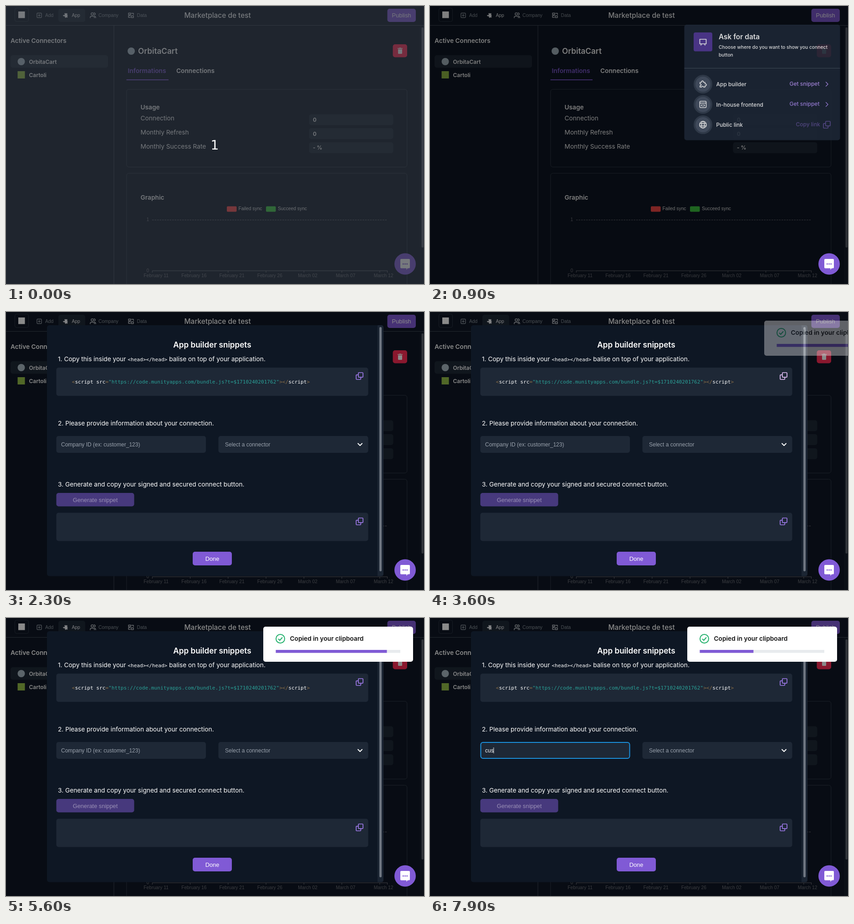
An HTML page for the animation above (8 s loop, 918 by 610 pixels).

```html
<!DOCTYPE html>
<html lang="en">
<head>
<meta charset="utf-8">
<title>Connector snippet demo</title>
<style>
html, body { margin: 0; width: 100%; height: 100%; overflow: hidden; background: #0e1724; }
svg { display: block; }
text { font-family: Inter, sans-serif; font-size: 13.71px; fill: #fff; white-space: pre; }
.b { font-weight: 600; }
.m { font-weight: 500; }
.s12 { font-size: 12px; }
.s17 { font-size: 17.14px; }
.mid { text-anchor: middle; }
.ar { font-family: "Liberation Sans", Arial, sans-serif; }
.nav { font-size: 10.29px; fill: #8a929c; }
.btn { font-size: 12.86px; }
.chart { font-size: 10.29px; fill: #6e7079; }
.hint { font-size: 12px; fill: #9aa2ad; }
.code { font-family: "DejaVu Sans Mono", monospace; font-size: 11.14px; }
.pen text { font-family: Lato, sans-serif; font-size: 13.2px; }
.pen .foot { font-size: 10.4px; }
.pen .ed { font-family: "Liberation Mono", monospace; font-size: 12px; }
.line { fill: none; stroke: currentColor; stroke-width: 1.4; stroke-linejoin: round; stroke-linecap: round; }
.cur { fill: currentColor; }

.t { animation: 8s step-end infinite; }
#count { animation-name: count; }
#hover { animation-name: hover; }
#pill { animation-name: pill; }
#shade { animation-name: shade; }
#pop { animation-name: pop; }
#get { animation-name: get; }
#modal { animation-name: modal; }
#copy1 { animation-name: copy; }
#toast { animation-name: toast; }
#bar { animation-name: bar; transform-origin: 592.5px 0; }
#pen { animation-name: pen; }
#penCaret { animation-name: penCaret; }
#paste { animation-name: paste; }
#focus { animation-name: focus; }
#hint { animation-name: hint; }
#caret { animation-name: caret; }
#k1 { animation-name: k1; }
#k2 { animation-name: k2; }
#k3 { animation-name: k3; }

@keyframes count { 0% { opacity: 1 } 1.2%, 100% { opacity: 0 } }
@keyframes hover { 0% { opacity: 0 } 6.2% { opacity: .45 } 7.45% { opacity: .85 } 8.7% { opacity: 1 }
  9.95% { opacity: .5 } 11.2%, 100% { opacity: 0 } }
@keyframes pill { 0% { opacity: 1 } 9.95% { opacity: 0 } 27.45%, 100% { opacity: 1 } }
@keyframes shade { 0% { opacity: 0 } 9.95% { opacity: .25 } 11.2% { opacity: .5 } 12.45% { opacity: .66 }
  27.45% { opacity: .55 } 28.7%, 100% { opacity: .46 } }
@keyframes pop { 0% { opacity: 0 } 9.95% { opacity: .4 } 11.2% { opacity: .85 } 12.45% { opacity: 1 }
  27.45% { opacity: .3 } 28.7%, 100% { opacity: 0 } }
@keyframes get { 0% { color: #b794f4 } 18.7% { color: #c0a0f6 } 19.95% { color: #ccaff8 }
  21.2% { color: #d7bdfa } 22.45%, 100% { color: #dfc6fc } }
@keyframes modal { 0% { opacity: 0 } 27.45% { opacity: .55 } 28.7%, 100% { opacity: 1 } }
@keyframes copy { 0% { color: #9f7aea } 41.2% { color: #e3c0f8 } 69.95%, 100% { color: #9f7aea } }
@keyframes toast { 0% { opacity: 0 } 44.95% { opacity: .36; transform: translateX(169px) }
  46.2% { opacity: .8; transform: translateX(50px) } 47.45% { opacity: .97; transform: translateX(8px) }
  48.7%, 100% { opacity: 1; transform: none } }
@keyframes bar { 0% { transform: scaleX(1) }
  44.95% { transform: scaleX(1); animation-timing-function: steps(5) } 51.2% { transform: scaleX(.9) }
  69.95% { transform: scaleX(.892); animation-timing-function: steps(24) }
  99.95%, 100% { transform: scaleX(.412) } }
@keyframes pen { 0% { opacity: 0 } 51.2% { opacity: 1 } 69.95%, 100% { opacity: 0 } }
@keyframes penCaret { 0% { opacity: 1 } 57.45% { opacity: 0 }
  63.7%, 100% { opacity: 1; transform: translateX(561px) } }
@keyframes paste { 0% { opacity: 0 } 63.7%, 100% { opacity: 1 } }
@keyframes focus { 0% { opacity: 0 } 84.95% { opacity: .6 } 86.2%, 100% { opacity: 1 } }
@keyframes hint { 0% { opacity: 1 } 92.45%, 100% { opacity: 0 } }
@keyframes caret { 0% { opacity: 0 } 84.95% { opacity: 1; transform: none }
  92.45% { opacity: 1; transform: translateX(6px) } 94.95% { opacity: 1; transform: translateX(12.7px) }
  97.45%, 100% { opacity: 1; transform: translateX(18.7px) } }
@keyframes k1 { 0% { visibility: hidden } 92.45%, 100% { visibility: visible } }
@keyframes k2 { 0% { visibility: hidden } 94.95%, 100% { visibility: visible } }
@keyframes k3 { 0% { visibility: hidden } 97.45%, 100% { visibility: visible } }
</style>
</head>
<body>
<svg width="918" height="610" viewBox="0 0 918 610">
<defs>
  <g id="copy" class="line" style="stroke-width:1.7">
    <rect x="5.8" y="1" width="10.2" height="10.2" rx="1.3"/>
    <path d="M5.5 5.8H2.3A1.3 1.3 0 0 0 1 7.1V14.7A1.3 1.3 0 0 0 2.3 16H9.9A1.3 1.3 0 0 0 11.2 14.7V11.5"/>
  </g>
  <path id="puzzle" d="M-6-3.5H-2.6A2.2 2.2 0 1 1 1.4-3.5H5V0A2.2 2.2 0 1 1 5 4V7H1.6A2 2 0 1 0-2.4 7H-6V3.8A2 2 0 1 0-6 0Z"/>
  <path id="chev" d="M0 0 4.5 4.5 0 9"/>
</defs>

<!-- app page -->
<rect width="918" height="610" fill="#0e1724"/>
<rect x="909" y="43" width="9" height="567" fill="#141d2a"/>
<rect x="912.5" y="47" width="4.5" height="483" rx="2" fill="#5c636c"/>
<path d="M0 42.5H918M237 43V610" stroke="#424b58" fill="none"/>
<rect x="19.500" y="4.500" width="30" height="29.500" rx="4" fill="none" stroke="#2c3644"/>
<rect x="27" y="12" width="14.500" height="14.500" fill="#fff"/>
<rect id="pill" class="t" x="115" y="6" width="59" height="29" rx="5" fill="#1e2836"/>
<g color="#8a929c" class="line">
  <rect x="68" y="15.500" width="10" height="10" rx="1.500"/><path d="M73 18.200V22.800M70.700 20.500H75.300"/>
</g>
<use href="#puzzle" transform="translate(131.500 20) rotate(40) scale(.72)" fill="#eef0f3"/>
<g color="#c3c8ce" class="line">
  <circle cx="189.500" cy="17.500" r="2.600"/><path d="M185 26V24.500Q185 22.500 187.500 22.500H191.500Q194 22.500 194 24.500V26M193.500 15Q196 15.500 196 17.500T193.500 20M195 22.500Q197 23 197 26"/>
  <path d="M269 15.500H274V19H269ZM276 16H280V19M275 21.500H280V25.500H275ZM269 21V25H273M270 21H273"/>
</g>
<g class="ar">
  <text class="ar nav" x="86" y="24">Add</text>
  <text class="ar nav" x="144.500" y="24" style="fill:#e8eaed">App</text>
  <text class="ar nav" x="203" y="24">Company</text>
  <text class="ar nav" x="287.500" y="24">Data</text>
</g>
<text class="m mid" x="464.700" y="25.800" style="font-size:15.43px">Marketplace de test</text>
<rect x="837.500" y="6" width="62.500" height="29" rx="5" fill="#805ad5"/>
<rect id="hover" class="t" x="837.500" y="6" width="62.500" height="29" rx="5" fill="#d6b3fb"/>
<text class="ar btn mid" x="868.700" y="25">Publish</text>

<text class="b" x="10" y="80.500">Active Connectors</text>
<rect x="10" y="108" width="214" height="27.500" rx="5" fill="#1e2836"/>
<circle cx="33.500" cy="122" r="8" fill="#a9bac4"/>
<rect x="25.500" y="143" width="16" height="16" fill="#95bf47"/>
<text class="b s12" x="50.500" y="126.500">OrbitaCart</text>
<text class="b s12" x="50.500" y="156">Cartoli</text>

<circle cx="275" cy="99" r="8" fill="#a9bac4"/>
<text class="b s17" x="290" y="104.700">OrbitaCart</text>
<rect x="849.500" y="84" width="31.500" height="28.500" rx="5" fill="#fe2c55"/>
<path d="M860 92.500H863L864 91.500H867L868 92.500H871V94H860ZM861 95H870V103.500Q870 105 868.500 105H862.500Q861 105 861 103.500Z" fill="#fff"/>
<text class="b" x="267.500" y="147.300" style="fill:#805ad5">Informations</text>
<text class="b" x="374" y="147.300">Connections</text>
<rect x="264.500" y="161" width="92.500" height="1.800" fill="#805ad5"/>
<g fill="none" stroke="#343d4a">
  <rect x="264.800" y="182.800" width="616" height="170.500" rx="5"/>
  <rect x="264.800" y="367" width="616" height="260" rx="5"/>
</g>
<text class="b" x="295.500" y="227">Usage</text>
<text x="295.500" y="251">Connection</text>
<text x="295.500" y="282">Monthly Refresh</text>
<text x="295.500" y="313">Monthly Success Rate</text>
<g fill="#1e2836">
  <rect x="665.500" y="237.500" width="185" height="24" rx="5"/>
  <rect x="665.500" y="268" width="185" height="24" rx="5"/>
  <rect x="665.500" y="299" width="185" height="24" rx="5"/>
</g>
<text class="b s12" x="674" y="253.500">0</text>
<text class="b s12" x="674" y="284.500">0</text>
<text class="b s12" x="674" y="315">- %</text>
<text class="b" x="295.500" y="425">Graphic</text>
<rect x="485" y="439.500" width="21.500" height="12" rx="2" fill="#fe4a49"/>
<rect x="571" y="439.500" width="21.500" height="12" rx="2" fill="#3fcc40"/>
<text class="ar chart" x="510.500" y="448.200" style="fill:#e8e8e8">Failed sync</text>
<text class="ar chart" x="597" y="448.200" style="fill:#e8e8e8">Succeed sync</text>
<text class="ar chart" x="308.500" y="472">1</text>
<text class="ar chart" x="308.500" y="583.500">0</text>
<path d="M321 469.500H838" stroke="#6e7079" stroke-dasharray="3.500 2"/>
<path d="M321 581H838M837.500 581V585" stroke="#6e7079"/>
<g id="axis"></g>

<rect id="shade" class="t" width="918" height="610" fill="#000"/>

<!-- ask for data -->
<g id="pop" class="t">
  <rect x="558.500" y="41" width="342" height="253.500" rx="5" fill="#1e2837"/>
  <path d="M558.500 136.500H900.500" stroke="#4a5563"/>
  <rect x="579" y="58" width="41" height="41.500" rx="4" fill="#553c9a"/>
  <path class="line" color="#fff" d="M592.500 73H606.500V83H592.500ZM596 83 595 86M603 83 604 86" style="stroke-width:1.700"/>
  <text class="b" x="634" y="73" style="font-size:15.43px">Ask for data</text>
  <text class="m" x="634" y="93.500" style="font-size:10.29px">Choose where do you want to show you connect</text>
  <text class="m" x="634" y="110.500" style="font-size:10.29px">button</text>
  <g fill="#4a5568" stroke="#374252" stroke-width="4">
    <circle cx="599.500" cy="171.500" r="18.500"/><circle cx="599.500" cy="216" r="18.500"/><circle cx="599.500" cy="260.500" r="18.500"/>
  </g>
  <g class="line" color="#fff" style="stroke-width:1.600">
    <use href="#puzzle" x="599" y="171"/>
    <rect x="592.500" y="209" width="14" height="14" rx="2"/><path d="M592.500 213H606.500M598 216 596 218 598 220M601 216 603 218 601 220"/>
    <circle cx="599.500" cy="260.500" r="7.500"/><ellipse cx="599.500" cy="260.500" rx="3.200" ry="7.500"/><path d="M592.500 258H606.500M592.500 263H606.500"/>
  </g>
  <text class="m s12" x="628.500" y="176">App builder</text>
  <text class="m s12" x="628.500" y="220.500">In-house frontend</text>
  <text class="m s12" x="628.500" y="265">Public link</text>
  <g id="get" class="t" color="#b794f4">
    <text class="m s12 cur" x="789.500" y="174.500" style="fill:currentColor">Get snippet</text>
    <use href="#chev" class="line" x="869.500" y="167"/>
  </g>
  <g color="#a98aee">
    <text class="m s12" x="789.500" y="219" style="fill:currentColor">Get snippet</text>
    <use href="#chev" class="line" x="869.500" y="211.500"/>
  </g>
  <g color="#5f5094">
    <text class="m s12" x="803.500" y="263.700" style="fill:currentColor">Copy link</text>
    <use href="#copy" x="863" y="252"/>
  </g>
</g>

<!-- snippets dialog -->
<g id="modal" class="t">
  <rect x="90" y="29" width="739" height="550.500" rx="5" fill="#0e1724"/>
  <path d="M816 29H824Q829 29 829 34V574.500Q829 579.500 824 579.500H816Z" fill="#1b2533"/>
  <rect x="820" y="33" width="5" height="536" rx="2.500" fill="#6e7681"/>
  <text class="b s17 mid" x="453" y="78">App builder snippets</text>
  <text x="114" y="108">1. Copy this inside your <tspan class="code">&lt;head&gt;&lt;/head&gt;</tspan> balise on top of your application.</text>
  <g fill="#1e2836">
    <rect x="110.500" y="122" width="685" height="62" rx="5"/>
    <rect x="110.500" y="272" width="328.500" height="37" rx="5"/>
    <rect x="466.500" y="272" width="329" height="37" rx="5"/>
    <rect x="110.500" y="440.500" width="685" height="62" rx="5"/>
  </g>
  <text class="code" x="144.700" y="157"><tspan fill="#8b6f47">&lt;</tspan>script src<tspan fill="#8b6f47">=</tspan><tspan fill="#2aa198">"https://code.munityapps.com/bundle.js?t=$1710240201762"</tspan><tspan fill="#8b6f47">&gt;&lt;/</tspan>script<tspan fill="#8b6f47">&gt;</tspan></text>
  <g id="copy1" class="t" color="#9f7aea"><use href="#copy" x="768" y="132"/></g>
  <g color="#9f7aea"><use href="#copy" x="768" y="451"/></g>
  <text x="114" y="249">2. Please provide information about your connection.</text>
  <text id="hint" class="ar hint t" x="121" y="295">Company ID (ex: customer_123)</text>
  <rect id="focus" class="t" x="111.500" y="273" width="327" height="35" rx="5" fill="none" stroke="#1b90dc" stroke-width="2"/>
  <text class="ar s12" x="121" y="295"><tspan id="k1" class="t">c</tspan><tspan id="k2" class="t">u</tspan><tspan id="k3" class="t">s</tspan></text>
  <rect id="caret" class="t" x="120.500" y="284" width="1" height="13" fill="#fff"/>
  <text class="ar hint" x="481" y="295">Select a connector</text>
  <path class="line" color="#fff" d="M773 288.500 777.500 293 782 288.500" style="stroke-width:2"/>
  <text x="114" y="383">3. Generate and copy your signed and secured connect button.</text>
  <rect x="110.500" y="397" width="171" height="29.500" rx="5" fill="#47397d"/>
  <text class="ar btn mid" x="196" y="416.500" style="fill:#9a90b6">Generate snippet</text>
  <rect x="410" y="526" width="86" height="30" rx="5" fill="#805ad5"/>
  <text class="ar btn mid" x="453" y="546">Done</text>
</g>

<circle cx="876.500" cy="566" r="23.500" fill="#805ad5"/>
<path d="M868 555H885Q887 555 887 557V573.500Q887 575.500 885 575.500H882L879.500 579V575.500H868Q866 575.500 866 573.500V557Q866 555 868 555Z" fill="#fff"/>
<g fill="#805ad5"><circle cx="872.300" cy="566" r="1.500"/><circle cx="876.500" cy="566" r="1.500"/><circle cx="880.700" cy="566" r="1.500"/></g>

<g id="toast" class="t">
  <rect x="565" y="19" width="329" height="77" rx="5" fill="#fff"/>
  <circle cx="602.500" cy="45.500" r="9.500" fill="none" stroke="#22b06c" stroke-width="2"/>
  <path d="M598 45.800 601.300 49 607 42.500" fill="none" stroke="#22b06c" stroke-width="2"/>
  <text class="b" x="623.500" y="49.700" style="fill:#111">Copied in your clipboard</text>
  <rect x="592.500" y="70" width="273.500" height="6.500" fill="#e8ebee"/>
  <rect id="bar" class="t" x="592.500" y="70" width="273.500" height="6.500" fill="#805ad5"/>
</g>

<!-- code playground -->
<g id="pen" class="t pen">
  <rect width="918" height="610" fill="#040404"/>
  <path d="M0 54H918M12.500 54V307M906.500 54V307M891 86V307" stroke="#2b2d33" fill="none"/>
  <path d="M13 54.500H95V86H890.500V307H13Z" fill="#1d1e20"/>
  <path d="M0 307.500H918" stroke="#2b2d33"/>
  <circle cx="17" cy="26" r="13" fill="#fff"/>
  <text x="37" y="21.800" style="font-size:17.14px;font-weight:700">Untitled</text>
  <path d="M104 21.500 104.700 18 110.500 12.200 113.300 15 107.500 20.800ZM111.300 11.400 112.700 10.200 115.300 12.800 114 14.200Z" fill="#fff"/>
  <text x="37" y="39" style="font-size:11.700px;fill:#a0a3aa">Colonel Incognito</text>
  <g fill="#444857">
    <rect x="517" y="7" width="77" height="37.500" rx="3.500"/><rect x="603" y="7" width="96.500" height="37.500" rx="3.500"/>
    <rect x="708" y="7" width="46.500" height="37.500" rx="3.500"/><rect x="847" y="7" width="66" height="37.500" rx="3.500"/>
    <rect x="763" y="7" width="75" height="37.500" rx="3.500" fill="#47cf73"/>
    <rect x="835" y="63.500" width="22" height="13.500" rx="2"/><rect x="860" y="63.500" width="22" height="13.500" rx="2"/>
  </g>
  <path d="M536.500 31.500A3.500 3.500 0 0 1 536 24.800 4.300 4.300 0 0 1 543.500 23 3.200 3.200 0 0 1 546 26 2.800 2.800 0 0 1 545.500 31.500Z" fill="#fff"/>
  <g fill="none" stroke="#fff">
    <circle cx="626" cy="26" r="3.700" stroke-width="3"/><circle cx="626" cy="26" r="6" stroke-width="2" stroke-dasharray="2.500 2.210"/>
    <circle cx="846" cy="70.200" r="2.300" stroke-width="1.800"/><circle cx="846" cy="70.200" r="3.700" stroke-width="1.200" stroke-dasharray="1.500 1.406"/>
    <path d="M867 68.500 871 72.300 875 68.500" stroke-width="1.800"/>
  </g>
  <path d="M724 19.500H730.800V25H724ZM732 19.500H738.500V25H732ZM724 26.200H730.800V32H724ZM732 26.200H738.500V32H732Z" fill="#fff"/>
  <text x="551" y="31">Save</text>
  <text x="637" y="31">Settings</text>
  <text class="mid" x="800.500" y="31" style="fill:#000">Sign Up</text>
  <text class="mid" x="880" y="31">Log In</text>
  <rect x="23" y="64" width="15" height="15" rx="3" fill="#ff3c41"/>
  <text x="42.500" y="76.500" style="font-size:15px;fill:#b4b7bf">HTML</text>
  <rect x="97" y="64" width="96" height="13.500" rx="2.500" fill="#ffdd40"/>
  <text x="103" y="74" style="font-size:8.570px;fill:#000"><tspan font-weight="700">11</tspan> unsaved changes</text>
  <path d="M181 67.500 187.500 74M187.500 67.500 181 74" stroke="#000" stroke-width="1.300"/>
  <rect x="893.500" y="61" width="10" height="9.500" rx="2" fill="#0ebeff"/>
  <rect x="909" y="61" width="10" height="9.500" rx="2" fill="#fcd000"/>
  <text transform="translate(895.500 74) rotate(90)" style="font-size:8.600px;fill:#b4b7bf">CSS</text>
  <text transform="translate(911 74) rotate(90)" style="font-size:8.600px;fill:#b4b7bf">JS</text>
  <rect x="882" y="86.500" width="8.500" height="200.500" fill="#6b707c"/>
  <text class="ed" x="28" y="102" style="fill:#484a4e">1</text>
  <path d="M38 97H43.500L40.700 102Z" fill="#484a4e"/>
  <text class="ed" x="28" y="120" style="fill:#484a4e">2</text>
  <text class="ed" x="50" y="102"><tspan fill="#a7925a">&lt;h1&gt;</tspan> Demo website <tspan fill="#a7925a">&lt;/h1&gt;</tspan></text>
  <text id="paste" class="ed t" x="50" y="120" style="fill:#a7925a">&lt;script <tspan fill="#ddca7e">src</tspan><tspan fill="#fff">=</tspan><tspan fill="#96b38a">"https://code.munityapps.com/bundle.js?t=$1710240201762"</tspan>&gt;&lt;/script&gt;</text>
  <rect id="penCaret" class="t" x="50" y="108" width="1" height="18" fill="#fff"/>
  <rect y="323" width="918" height="262" fill="#fff"/>
  <text x="4.500" y="366" style="font:700 27.430px 'Liberation Serif',serif;fill:#000">Demo website</text>
  <rect y="585" width="918" height="25" fill="#2c303a"/>
  <g fill="#444857">
    <rect x="2" y="588" width="49.500" height="20" rx="2"/><rect x="55" y="588" width="43.500" height="20" rx="2"/><rect x="102" y="588" width="57" height="20" rx="2"/>
  </g>
  <text class="foot mid" x="26.700" y="601.700">Console</text>
  <text class="foot mid" x="77" y="601.700">Assets</text>
  <text class="foot mid" x="130.700" y="601.700">Shortcuts</text>
</g>

<!-- countdown -->
<g id="count" class="t">
  <rect width="918" height="610" fill="#292e34" opacity=".64"/>
  <text class="mid" x="458.500" y="315" style="font:28px 'DejaVu Sans',sans-serif">1</text>
</g>
</svg>
<script>
const days = ['February 11', 'February 16', 'February 21', 'February 26', 'March 02', 'March 07', 'March 12'];
document.getElementById('axis').innerHTML = days.map((day, i) => {
  const x = 321.3 + i * 83.25;
  return `<path d="M${x} 581V585" stroke="#6e7079"/><text class="ar chart mid" x="${x + 8.3}" y="595.3">${day}</text>`;
}).join('');
</script>
</body>
</html>
```
